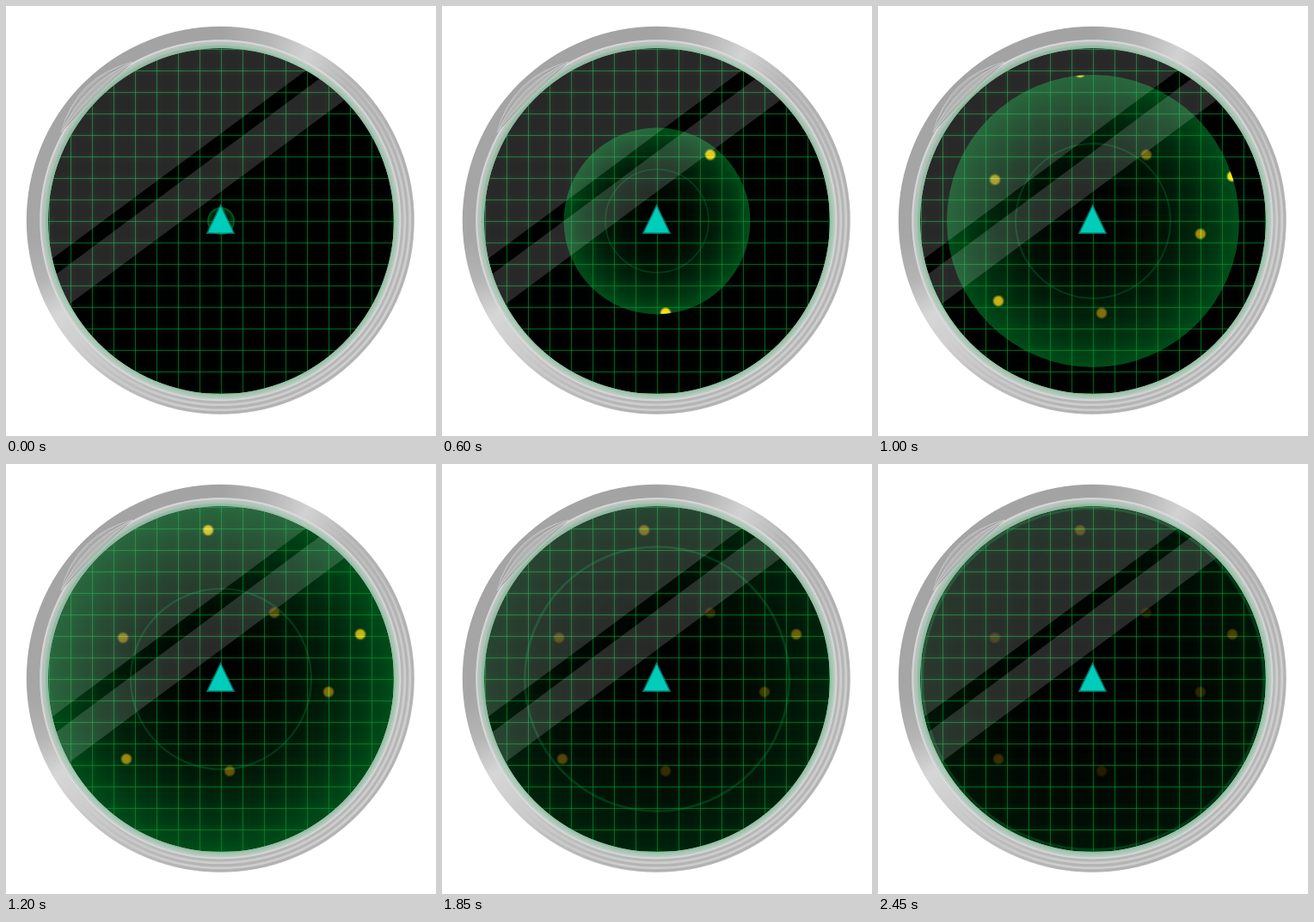
These frames come from a looping animation (500x500 px, 2500 ms). An HTML page with a canvas:

```html
<!DOCTYPE html>
<html lang="en">
<head>
<meta charset="utf-8">
<title>Radar</title>
<style>
  html, body { margin: 0; width: 100%; height: 100%; overflow: hidden; background: #fff; }
  canvas { display: block; width: 500px; height: 500px; }
</style>
</head>
<body>
<canvas id="radar" width="500" height="500"></canvas>
<script>
const LOOP = 2500, STEP = 50, SIZE = 500, C = 250, R = 201.5, TAU = Math.PI * 2;
const ctx = document.getElementById('radar').getContext('2d');
const blips = [[312, 173], [136, 202], [375, 265], [260, 357], [140, 343], [235, 77], [412, 198]];

const gray = (v, a = 1) => `rgba(${v},${v},${v},${a})`;

function circle(g, r, x = C, y = C) {
  g.beginPath();
  g.arc(x, y, r, 0, TAU);
}

function layer(draw) {
  const c = document.createElement('canvas');
  c.width = c.height = SIZE;
  draw(c.getContext('2d'));
  return c;
}

// Conic gradient from [degrees, colour] pairs, clockwise from the right.
function conic(g, stops) {
  const grad = g.createConicGradient(0, C, C);
  stops.forEach(([deg, color]) => grad.addColorStop(deg / 360, color));
  return grad;
}

function ring(g, r, width, style) {
  circle(g, r, 249.3, 249.3);
  g.lineWidth = width;
  g.strokeStyle = style;
  g.stroke();
}

const grid = layer(g => {
  circle(g, R);
  g.clip();
  const lines = (w, color) => {
    g.fillStyle = color;
    for (let p = 50; p <= 450; p += 25) {
      g.fillRect(p - (w - 1) / 2, 48, w, 404);
      g.fillRect(48, p - (w - 1) / 2, 404, w);
    }
  };
  lines(11, 'rgba(0,130,45,.02)');
  lines(5, 'rgba(0,130,45,.04)');
  lines(1, 'rgba(0,160,58,.56)');
});

const glass = layer(g => {
  circle(g, R);
  g.clip();
  g.fillStyle = gray(255, .157);
  const band = (top, bottom) => {
    const slope = .742 * SIZE;
    g.beginPath();
    g.moveTo(0, top);
    g.lineTo(SIZE, top - slope);
    g.lineTo(SIZE, bottom - slope);
    g.lineTo(0, bottom);
    g.fill();
  };
  band(-200, 333.7);
  band(355, 401.4);
});

const rim = layer(g => {
  // Keep the metal outside the screen.
  g.beginPath();
  g.rect(0, 0, SIZE, SIZE);
  g.arc(C, C, 201, 0, TAU, true);
  g.clip('evenodd');

  const metal = [[0, 188], [45, 188], [90, 184], [122, 194], [136, 204], [150, 214], [162, 180],
    [175, 166], [225, 164], [270, 163], [285, 182], [297, 210], [312, 182], [330, 178], [360, 188]];
  ring(g, 212.5, 26, conic(g, metal.map(([d, v]) => [d, gray(v)])));

  // Fine machined grooves on the lower right.
  const groove = (r, w, v) => ring(g, r, w, conic(g,
    [[0, gray(v, .75)], [100, gray(v, .75)], [140, gray(v, 0)], [300, gray(v, 0)], [345, gray(v, .7)], [360, gray(v, .75)]]));
  groove(223.5, 2, 174);
  groove(220.5, 2.5, 214);
  groove(217.5, 2, 178);
  groove(214.5, 2.5, 212);
  groove(211.5, 2, 180);

  ring(g, 207, 6, gray(204, .7));
  ring(g, 209, 2, gray(226, .7));
  ring(g, 205.5, 1.5, gray(176, .5));

  // Curved reflection on the upper left.
  const lens = (outer, inner) => {
    g.beginPath();
    g.moveTo(64, 147);
    g.quadraticCurveTo(outer, outer, 147, 65);
    g.quadraticCurveTo(inner, inner, 64, 147);
  };
  lens(82, 106);
  g.fillStyle = gray(178);
  g.fill();
  g.lineWidth = 1;
  [[82, 106, 200], [87, 102, 154], [91, 98, 200]].forEach(([o, i, v]) => {
    lens(o, i);
    g.strokeStyle = gray(v);
    g.stroke();
  });

  const glow = g.createRadialGradient(C, C, 201, C, C, 210);
  glow.addColorStop(0, 'rgba(125,190,152,.8)');
  glow.addColorStop(.5, 'rgba(165,208,182,.5)');
  glow.addColorStop(1, 'rgba(180,210,193,0)');
  circle(g, 210);
  g.fillStyle = glow;
  g.fill();
});

function drawSweep(r) {
  const grad = ctx.createRadialGradient(C, C, 0, C, C, r);
  for (let u = 0; u <= 10; u++) {
    grad.addColorStop(u / 10, `rgba(0,76,25,${(u / 10) ** 2})`);
  }
  circle(ctx, r);
  ctx.fillStyle = grad;
  ctx.fill();
}

// Blips add light to the screen, so the grid shines through them.
function drawBlips(r) {
  ctx.save();
  circle(ctx, r);
  ctx.clip();
  ctx.globalCompositeOperation = 'lighter';
  for (const [x, y] of blips) {
    const u = Math.hypot(x - C, y - C) / r;
    const a = Math.min(1, 1.05 * u ** 1.5);
    const grad = ctx.createRadialGradient(x, y, 0, x, y, 7.5);
    grad.addColorStop(0, `rgba(255,155,0,${a})`);
    grad.addColorStop(.62, `rgba(255,155,0,${a * .93})`);
    grad.addColorStop(.82, `rgba(255,150,0,${a * .35})`);
    grad.addColorStop(1, 'rgba(255,150,0,0)');
    circle(ctx, 7.5, x, y);
    ctx.fillStyle = grad;
    ctx.fill();
  }
  ctx.restore();
}

function drawShip() {
  ctx.beginPath();
  ctx.moveTo(249.5, 233.5);
  ctx.lineTo(264, 263.5);
  ctx.lineTo(235, 263.5);
  ctx.closePath();
  ctx.lineWidth = 3;
  ctx.strokeStyle = 'rgba(0,205,185,.55)';
  ctx.stroke();
  ctx.fillStyle = 'rgb(0,205,185)';
  ctx.fill();
}

function render(t) {
  const sweep = 16 + .154 * t, echo = 15 + .075 * t;
  ctx.fillStyle = '#fff';
  ctx.fillRect(0, 0, SIZE, SIZE);

  ctx.save();
  circle(ctx, R);
  ctx.fillStyle = '#000';
  ctx.fill();
  ctx.clip();
  drawSweep(sweep);
  circle(ctx, echo);
  ctx.lineWidth = 1 + echo / 90;
  ctx.strokeStyle = 'rgba(0,160,65,.27)';
  ctx.stroke();
  ctx.drawImage(grid, 0, 0);
  drawBlips(sweep);
  ctx.drawImage(glass, 0, 0);
  drawShip();
  ctx.restore();

  ctx.drawImage(rim, 0, 0);
}

const start = performance.now();
function tick() {
  const t = (performance.now() - start) % LOOP;
  render(Math.floor(t / STEP) * STEP);
  requestAnimationFrame(tick);
}
tick();
</script>
</body>
</html>
```
